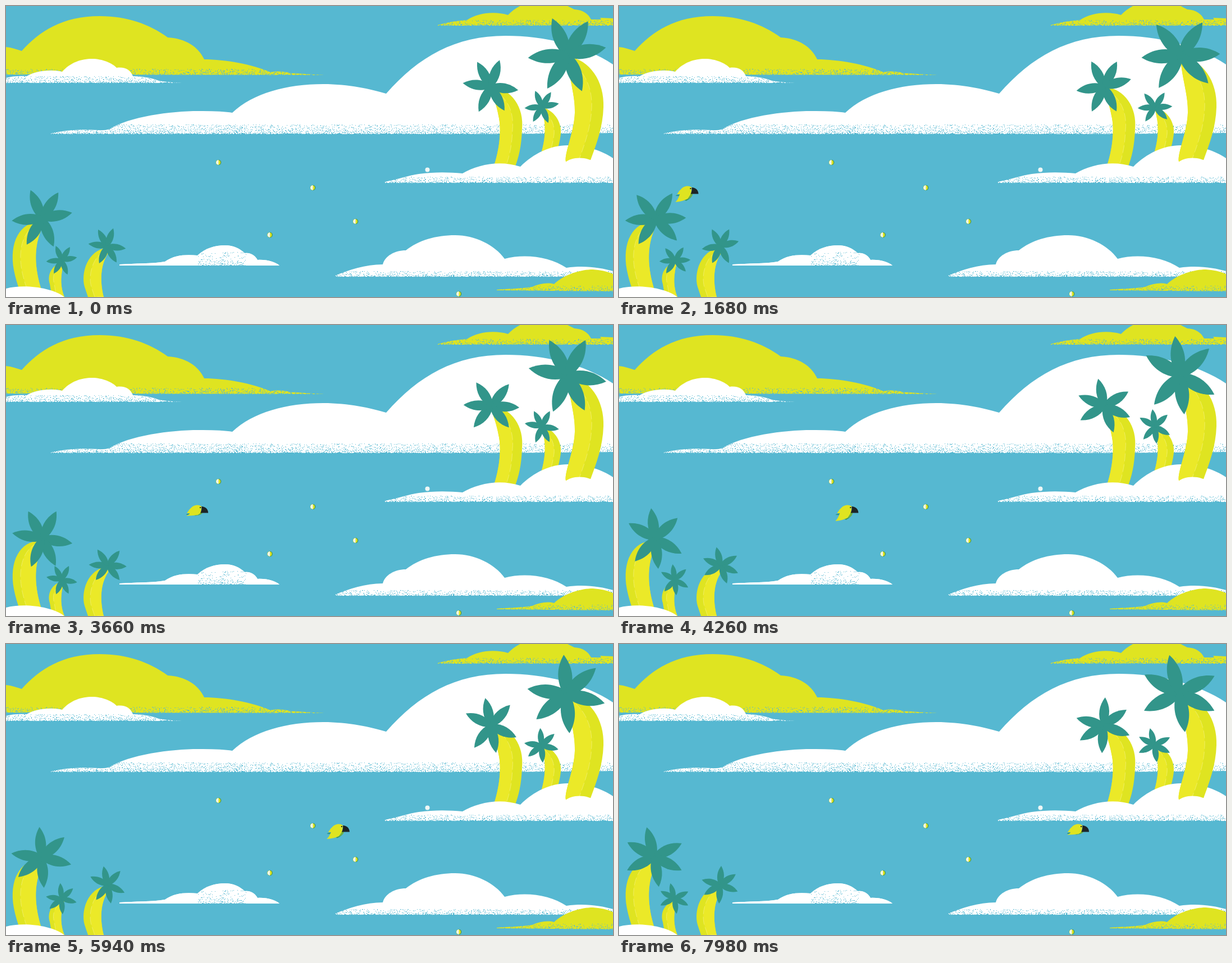
An HTML page with a canvas for the animation above (8000 ms loop, 1081 by 518 pixels).

```html
<!DOCTYPE html>
<html lang="en">
<head>
<meta charset="utf-8">
<title>Island sky</title>
<style>
html, body { margin: 0; width: 100%; height: 100%; overflow: hidden; background: #56b8d1; }
canvas { display: block; width: 1081px; height: 518px; }
</style>
</head>
<body>
<canvas id="stage" width="1081" height="518"></canvas>
<script>
const W = 1081, H = 518, LOOP = 8000, STEP = 60;
const SKY = '#56b8d1', WHITE = '#ffffff', YELLOW = '#dfe421', LIGHT = '#ebe928',
      LEAF = '#32958a', GREEN = '#6fb043', BLACK = '#1d2426';
const ctx = document.getElementById('stage').getContext('2d');
const scene = document.createElement('canvas');
scene.width = W;
scene.height = H;
const bg = scene.getContext('2d');

let seed = 7;
const rand = () => (seed = seed * 16807 % 2147483647) / 2147483647;

function shape(c, color, d) {
  const path = new Path2D(d);
  c.fillStyle = color;
  c.fill(path);
  return path;
}

// A cloud whose lower edge, from x0 to x1 above y, dissolves into sky-coloured grain.
function cloud(color, d, x0, x1, y, h, density = 0.2) {
  const path = shape(bg, color, d);
  bg.save();
  bg.clip(path);
  bg.fillStyle = SKY;
  for (let n = (x1 - x0) * h * density; n > 0; n--) {
    const x = Math.floor(x0 + rand() * (x1 - x0));
    bg.fillRect(x, Math.floor(y - h * rand() ** 2), 1, 1);
  }
  bg.restore();
}

// A trunk split into a lit and a shaded half by a thin pale line.
function trunk(d, shift) {
  const path = shape(bg, YELLOW, d);
  bg.save();
  bg.clip(path);
  bg.translate(shift, 0);
  bg.fillStyle = LIGHT;
  bg.fill(path);
  bg.strokeStyle = '#f1ef70';
  bg.lineWidth = 0.8;
  bg.setLineDash([14, 5]);
  bg.stroke(path);
  bg.restore();
}

function ball(x, y, plain) {
  const disc = (color, cx, r, from = 0, to = 2 * Math.PI) => {
    bg.fillStyle = color;
    bg.beginPath();
    bg.arc(cx, y, r, from, to);
    bg.fill();
  };
  if (plain) return disc('#eef7f6', x, 4);
  disc('#4f9a4c', x, 4.8);
  disc(YELLOW, x - 0.6, 4);
  disc('#f0f6ec', x, 4.4, Math.PI / 2, Math.PI * 1.5);
}

function drawScene() {
  bg.fillStyle = SKY;
  bg.fillRect(0, 0, W, H);

  cloud(YELLOW, `M0 73C10 74 18 77 28 80C60 45 100 18 167 18C215 18 255 32 288 56
    C320 58 342 72 353 95C390 95 440 104 471 118C480 115 500 117 508 120
    C520 119 530 122 569 123L0 122Z`, 0, 569, 123, 11);
  cloud(WHITE, `M0 128C10 125 25 124 37 125C50 116 80 112 100 117C115 100 135 94 153 94
    C172 94 190 102 197 110C212 108 222 114 226 125C245 125 262 129 272 133
    Q290 136 313 137L0 137Z`, 0, 313, 137, 12);
  cloud(YELLOW, `M769 34C785 29 805 26 821 25C840 12 870 9 894 16C905 5 918-4 940-8H985
    C1000 0 1010 5 1012 6C1028 7 1037 14 1042 24L1060 24L1058 21L1081 22V35H769Z`,
    769, W, 35, 10);
  cloud(WHITE, `M80 227C100 222 130 219 165 221Q175 222 185 219C220 196 300 186 350 187
    Q385 187 403 190C440 155 500 139 565 139C610 139 650 148 677 156
    C735 90 800 53 890 53C960 53 1030 70 1081 104V226L875 228H80Z`, 80, W, 228, 17);

  trunk(`M954 180C975 185 990 205 988 228Q986 245 980 262H953C960 240 962 215 957 195Z`, -12);
  trunk(`M864 143C901 148 923 180 919 220C918 250 913 270 906 288H868
    C879 255 883 220 877 195C874 178 869 165 864 150Z`, -17);
  cloud(WHITE, `M675 313C700 308 715 302 735 299C765 295 790 296 813 298
    C840 282 880 274 916 286C940 262 970 248 1000 248C1035 248 1062 258 1081 271V315H675Z`,
    675, W, 315, 11);
  trunk(`M1000 90C1040 95 1066 135 1064 180C1063 215 1052 245 1040 277H997
    C994 262 1012 225 1013 190C1014 160 1004 135 1000 95Z`, -21);
  shape(bg, WHITE, 'M994 280C1008 267 1035 268 1052 280Z');

  trunk(`M60 384C25 385 5 420 14 470Q18 490 25 508H64C50 465 50 430 62 400Z`, 14);
  trunk(`M105 455C85 458 72 475 78 495L82 518H104C97 500 97 485 101 465Z`, 8);
  trunk(`M180 430C145 435 133 475 140 500L146 518H174C167 490 168 460 182 440Z`, 12);
  shape(bg, WHITE, 'M0 503C30 495 80 500 104 518H0Z');

  const small = `M202 460C230 458 260 459 283 455C300 443 320 442 341 444
    C355 431 372 426 390 426C405 426 417 432 425 440C437 438 445 446 448 452
    C465 451 480 456 487 462H202Z`;
  cloud(WHITE, small, 202, 487, 462, 5, 0.1);
  cloud(WHITE, small, 342, 428, 462, 24, 0.1);
  cloud(WHITE, `M586 480C610 470 640 460 671 460C675 445 692 435 712 435
    C735 417 765 408 800 408C835 408 870 425 888 450C925 440 970 447 998 466
    C1030 461 1060 466 1081 472V482H586Z`, 586, W, 482, 10);
  cloud(YELLOW, `M874 505C900 503 920 503 937 500C950 494 965 492 976 495
    C995 477 1025 469 1045 469Q1065 470 1081 477V508L874 506Z`, 874, W, 508, 10);

  [[378.5, 278.5], [546.5, 323.5], [622.5, 383.5], [470, 407.5], [806.5, 512.5]]
    .forEach(p => ball(...p));
  ball(750.5, 291.5, true);
}

const leaf = new Path2D('M-5 0C-17-25-14-49 0-70C14-49 17-25 5 0Z');
const leafAngles = [0, 54.5, 102, 180.5, 233, 288];
// x, y, scale, starting angle
const crowns = [
  [999, 88, 1, -22.5], [863.5, 144, 0.71, -83], [954, 180, 0.44, -22.5],
  [64, 379, 0.775, -22.5], [180.5, 428, 0.48, -83], [99, 453, 0.395, -22.5]
];

const radians = degrees => degrees * Math.PI / 180;

function crown(x, y, scale, angle) {
  ctx.save();
  ctx.translate(x, y);
  ctx.rotate(radians(angle));
  ctx.scale(scale, scale);
  ctx.translate(1, -1); // the hub turns slightly off centre
  ctx.fillStyle = LEAF;
  for (const a of leafAngles) {
    ctx.save();
    ctx.rotate(radians(a));
    ctx.fill(leaf);
    ctx.restore();
  }
  ctx.restore();
}

// The origin is level with the top of the head, above the beak tip; flap runs from 0 to 1.
function bird(x, flap) {
  ctx.save();
  ctx.translate(x, 320);
  const low = 18 + 5 * flap;
  shape(ctx, '#3f9a62', `M-11 13Q-10 ${16 + 5 * flap}-22 ${low + 3 * flap + 1}L-29 ${low}L-20 13Z`);
  shape(ctx, LEAF, `M-38 16L-30 15L-28 19L${-39 - 2 * flap} 18Z`);
  shape(ctx, YELLOW, `M-12 3C-17-1-24 0-29 4Q-35 9-38 15L-33 15L-34 17
    Q-36 ${18 + 6 * flap} ${-39 - 2 * flap} ${19 + 10 * flap}
    Q-28 ${19 + 9 * flap}-19 ${low}Q-14 16-13 13Z`);
  shape(ctx, GREEN, `M-13 14H-10Q-11 ${17 + 4 * flap}-19 ${low + 1}Q-15 17-13 14Z`);
  shape(ctx, BLACK, 'M-12 3C-5 3 0 8 0 14.5H-14Q-11 9-12 3Z');
  ctx.fillStyle = BLACK;
  ctx.fillRect(-15, 4, 2, 2);
  ctx.restore();
}

function draw(time) {
  const k = Math.floor(time % LOOP / STEP);
  ctx.drawImage(scene, 0, 0);
  for (const [x, y, scale, angle] of crowns) crown(x, y, scale, angle + 2 * k);
  bird(-44 + 6.625 * k, (1 - Math.cos((k - 82) / 7.2 * 2 * Math.PI)) / 2);
}

drawScene();
const start = performance.now();
function tick() {
  draw(performance.now() - start);
  requestAnimationFrame(tick);
}
tick();
</script>
</body>
</html>
```
